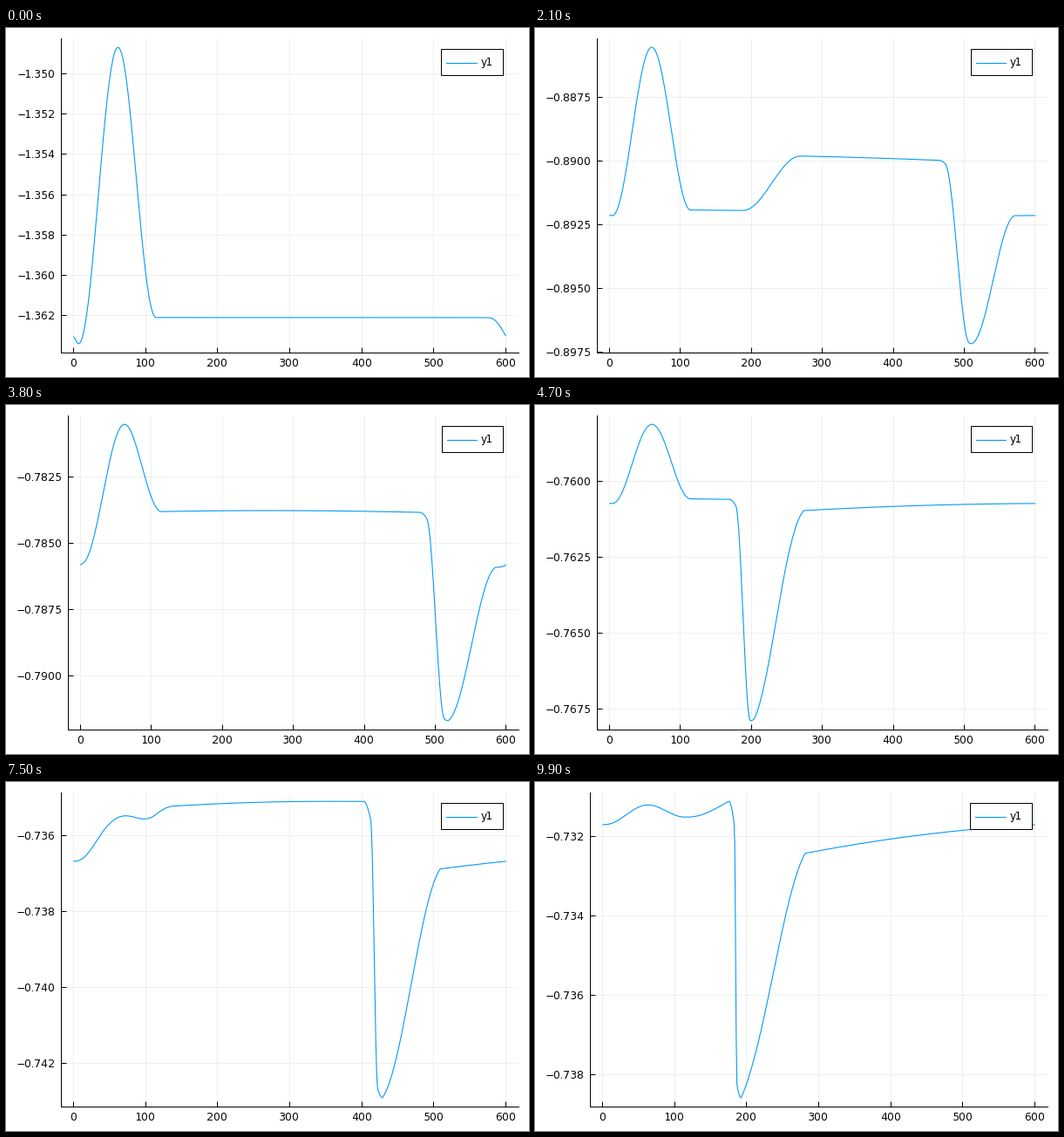
A matplotlib script for the animation above (10000 ms loop, 600 px wide and 400 px high).

```python
import numpy as np
import matplotlib.pyplot as plt
from matplotlib.animation import FuncAnimation
from matplotlib.patches import Rectangle

W, H, DPI = 600, 400, 100
FRAMES, INTERVAL = 100, 100
PX = 72 / DPI
N = 600
BLUE = "#009afa"

plt.rcParams.update({
    "font.family": "DejaVu Sans",
    "font.size": 12 * PX,
    "text.hinting": "force_autohint",
    "text.hinting_factor": 1,
})

x = np.arange(1, N + 1)


def rise(t, centre, half):
    """Smooth step from 0 to 1."""
    t = np.clip((t - centre) / half, -1, 1)
    return (1 + np.sin(np.pi / 2 * t)) / 2


def mean_level(k):
    return -0.7313 - 0.6297 * np.exp(-0.0657 * k + 1.7e-5 * k * k)


def wave(k):
    """Fixed bump, fast step and steepening dip on a ring, in 1e-3."""
    age = k / FRAMES
    grown = 1 - np.exp(-k / 3)

    # The dip's front gets short and steep, its back long and straight
    front, back = 54 - 0.37 * k, 53 + 0.36 * k
    depth = 8.45 - 0.0085 * k - 6.45 * np.exp(-k / 12)
    start = 643 - 34.85 * k - 17 * np.exp(-k / 3) - front

    jump = (2.6 - 0.02 * k) * grown
    jump_at = (1215.3 - 46.95 * k - start) % N
    jump_half = 41 + 0.1 * max(k - 29, 0)
    sill = (0.12 + 0.2 * np.exp(-k / 30)) * grown
    sill_at = (60 - start) % N
    refill = (0.25 + 0.55 * age ** 2) * grown
    slope = -0.8 * np.exp(-(k / 40) ** 2) * grown

    def ground(s):
        t = np.clip((s - front - back) / 450, 0, 1)
        g = slope * s / N + refill * (1 - (1 - t) ** 2)
        for n in (-N, 0, N):
            g = g + jump * rise(s, jump_at + n, jump_half)
            g = g + sill * rise(s, sill_at + n, 55)
        return g

    # The dip takes back what the ground gains over one lap
    drop = ground(N) - ground(0)
    s = (x - start) % N
    u, v = s / front, np.clip((s - front) / back, 0, 1)
    down = 0.2 * rise(u, 0.5, 0.5) + 0.8 * rise(u, 0.56, 0.44 - 0.34 * age)
    up = rise(v, 0.5, 0.5) + 0.5 * age * (v - rise(v, 0.5, 0.5))

    bump = 13.9 * np.exp(-0.0363 * k) * rise(-abs(x - 60), -27.5, 27.5)
    return ground(s) - depth * down + (depth - drop) * up + bump


def curve(k):
    y = wave(k)
    return mean_level(k) + (y - y.mean()) * 1e-3


def nice_ticks(lo, hi):
    """Pick the step with the best mix of count, coverage and niceness."""
    best, ticks, step = -1, [], 0
    for size, nice in ((0.0025, 0.5), (0.001, 1), (0.005, 0.9),
                       (0.002, 0.7), (0.003, 0.2)):
        t = np.arange(np.ceil(lo / size), np.floor(hi / size) + 1) * size
        if not 4 <= len(t) <= 8:
            continue
        score = ((1 - abs(len(t) - 5) / 5) / 4 + nice / 4
                 + 0.5 * (hi - lo) / ((len(t) - 1) * size))
        if score > best + 1e-9:
            best, ticks, step = score, t, size
    return ticks, 4 if step == 0.0025 else 3


fig = plt.figure(figsize=(W / DPI, H / DPI), dpi=DPI, facecolor="white")
ax = fig.add_axes([0.1, 0.1, 0.8, 0.8])
ax.set_xlim(1 - 0.03 * (N - 1), N + 0.03 * (N - 1))
ax.set_xticks(range(0, 601, 100))
ax.spines[["top", "right"]].set_visible(False)
ax.spines[["left", "bottom"]].set_linewidth(PX)
ax.tick_params(direction="in", length=6 * PX, width=PX, pad=6.5 * PX)
ax.grid(color="black", alpha=0.06, linewidth=PX)
ax.set_axisbelow(True)
line, = ax.plot(x, np.zeros(N), color=BLUE, lw=1.1 * PX)

# Legend in pixel coordinates
top = fig.add_axes([0, 0, 1, 1], zorder=5)
top.set_xlim(0, W)
top.set_ylim(H, 0)
top.axis("off")
box = top.add_patch(Rectangle((499, 24), 71, 30, fc="white", ec="black",
                              lw=PX))
key, = top.plot([505, 540], [40, 40], color=BLUE, lw=1.1 * PX)
top.text(545, 43.5, "y1", va="baseline")


def update(k):
    y = curve(k)
    line.set_ydata(y)
    pad = 0.03 * (y.max() - y.min())
    lo, hi = y.min() - pad, y.max() + pad
    ticks, digits = nice_ticks(lo, hi)
    ax.set_ylim(lo, hi)
    ax.set_yticks(ticks, [f"{t:.{digits}f}".replace("-", "\u2212")
                          for t in ticks])
    wide = digits == 4
    left = 71 if wide else 63
    ax.set_position([left / W, 28 / H, (588 - left) / W, 360 / H])
    edge = 500 if wide else 499
    box.set_x(edge)
    box.set_width(570 - edge)
    key.set_xdata([edge + 6, 540])
    return line,


anim = FuncAnimation(fig, update, frames=FRAMES, interval=INTERVAL,
                     init_func=lambda: update(0), repeat=True, repeat_delay=0)
plt.show()
```
